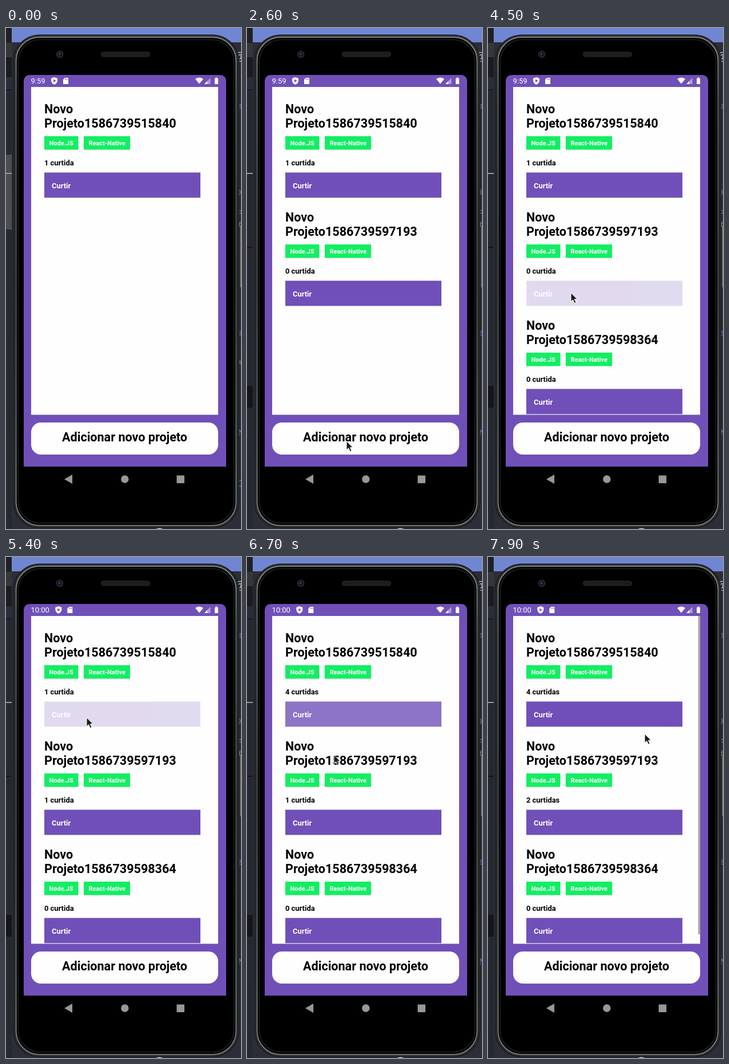
An HTML page for the animation above (8000 ms loop, 411 px wide and 875 px high).

```html
<!DOCTYPE html>
<html lang="pt-BR">
<head>
<meta charset="utf-8">
<title>Projetos</title>
<style>
  html, body { margin: 0; width: 100%; height: 100%; overflow: hidden; background: #272934; }
  svg { display: block; width: 100vw; height: 100vh; font-family: Roboto, sans-serif; }
  .title { font-size: 21.55px; font-weight: 700; }
  .tag { font-size: 11px; font-weight: 700; fill: #fff; }
  .small { font-size: 12.92px; font-weight: 700; }
  .code { font-size: 15px; fill: #5f7bd8; }
</style>
</head>
<body>
<svg viewBox="0 0 411 875" preserveAspectRatio="none">
  <defs>
    <linearGradient id="metal" x1="0" x2="0" y1="0" y2="1">
      <stop offset="0" stop-color="#858989"/>
      <stop offset=".12" stop-color="#5e6161"/>
      <stop offset=".5" stop-color="#4a4c4c"/>
      <stop offset="1" stop-color="#777a7a"/>
    </linearGradient>
    <clipPath id="list"><rect x="44" y="103" width="327" height="572.5"/></clipPath>
  </defs>

  <!-- desktop behind the phone -->
  <rect width="411" height="875" fill="#2b2d39"/>
  <rect x="10" width="401" height="25" fill="#7186d2"/>
  <rect width="10" height="875" fill="#252731"/>
  <rect width="10" height="26" fill="#202127"/>
  <rect y="26" width="10" height="25" fill="#363636"/>
  <rect y="51" width="10" height="35" fill="#1b1c21"/>
  <rect y="86" width="10" height="21" fill="#2a2c39"/>
  <rect y="107" width="10" height="1.5" fill="#17181d"/>
  <rect id="sidebar" y="221" width="10" height="131" fill="#4b4c50"/>
  <rect y="253" width="10" height="2" fill="#9a9a9a"/>
  <g id="sideLines" fill="#15161b">
    <rect y="382" width="10" height="2"/>
    <rect y="625" width="10" height="38"/>
  </g>
  <text x="400" y="55" font-size="19" fill="#ccc">@</text>
  <g class="code">
    <text x="405" y="141">a</text>
    <text id="codeMid" x="405" y="537">a</text>
    <text x="406" y="712">N</text>
    <text id="codeLow" x="405" y="801">G</text>
  </g>
  <g font-size="11" fill="#999">
    <text x="407" y="290">)</text>
    <text x="406" y="324">c</text>
    <text x="407" y="347">f</text>
    <text id="codeEnd" x="407" y="587">s</text>
  </g>
  <rect x="409.5" y="345" width="1.5" height="108" fill="#777"/>

  <!-- phone body -->
  <rect x="12" y="11.5" width="396" height="862" rx="47" fill="#17191a"/>
  <rect x="14" y="13.5" width="392" height="858" rx="45" fill="none" stroke="#3f4242"/>
  <rect x="17.5" y="16" width="385" height="853" rx="41" fill="#050505" stroke="url(#metal)" stroke-width="2.2"/>
  <rect x="21.5" y="20.5" width="377" height="844" rx="38" fill="#000" stroke="#1e2020" stroke-width="1.5"/>
  <path d="M262 875Q268 872 275 875Z" fill="#ddd"/>
  <circle cx="94" cy="46" r="6.5" fill="#252628"/>
  <circle cx="94" cy="46" r="4" fill="#15161d"/>
  <circle cx="93.5" cy="45.5" r="1.6" fill="#384691"/>
  <rect x="166.5" y="42" width="85" height="8" rx="4" fill="#1d1d1e" stroke="#2b2b2c"/>
  <g fill="#989898">
    <path d="M102 788L116 780V796Z"/>
    <circle cx="207.8" cy="788" r="6.7"/>
    <rect x="298.5" y="781.5" width="13.5" height="13.5" rx=".7"/>
  </g>

  <!-- app -->
  <path d="M31 766V94Q31 82 43 82H373Q385 82 385 94V766Z" fill="#7050b8"/>
  <g fill="#fff">
    <text id="clock" x="43.5" y="97" font-size="13"></text>
    <g id="icons">
      <path d="M84.5 86L90 88V92Q89.500 97 84.500 99Q79.500 97 79 92V88Z"/>
      <path d="M83 89.500L87.500 92.200L83 95Z" fill="#7050b8"/>
      <path d="M103 87H109V98H100V90Z"/>
      <path d="M103.500 88.500V91M105.500 88.500V91M107.500 88.500V91" stroke="#7050b8" stroke-width=".8"/>
    </g>
    <path d="M331 89Q338 84 345 89L338 97.500Z"/>
    <path d="M347 98L357.500 87V98Z" opacity=".45"/>
    <path d="M347 98L352 92.700V98Z"/>
    <path d="M365 88H366.500V86.500H369.500V88H371V98H365Z"/>
  </g>
  <rect x="44" y="103" width="327" height="572.5" fill="#fefefe"/>
  <g id="cards" clip-path="url(#list)"></g>
  <rect id="scrollbar" x="367.5" y="103" width="3.7" height="556" fill="#aaa"/>
  <rect x="44" y="689" width="327" height="56" rx="17" fill="#fefefe"/>
  <text id="add" class="title" x="207.5" y="721.5" text-anchor="middle">Adicionar novo projeto</text>

  <path id="cursor" d="M0 0V15.500L3.600 12.200L6.300 18.200L9 17L6.400 11.200H11.200Z" fill="#1c1c1c" stroke="#fff" stroke-width="1"/>
</svg>

<script>
const LOOP = 8000, STEP = 100, CARD_HEIGHT = 189;
const $ = id => document.getElementById(id);

const cards = [
  { stamp: '1586739515840', shown: 0, likes: 1, likedAt: [5600, 6100, 6400],
    presses: [[5400, 5500], [5800, 5920], [6300, 6540]] },
  { stamp: '1586739597193', shown: 2300, likes: 0, likedAt: [4700, 7400],
    presses: [[4500, 4600], [7200, 7290]] },
  { stamp: '1586739598364', shown: 3500, likes: 0, likedAt: [], presses: [] }
];
const addPresses = [[2100, 2330], [3300, 3340]];

// [time, x, y] of the pointer tip
const path = [
  [1200, 0, 690], [1300, 25, 735], [1400, 70, 751], [1600, 150, 737],
  [1800, 173, 723], [1900, 174, 721.5], [3600, 174, 721.5],
  [3800, 171, 680], [4100, 153, 530], [4300, 146, 470], [4400, 145, 462.5],
  [4700, 145, 462.5], [4900, 143, 390], [5100, 141, 295], [5200, 141, 280.5],
  [6500, 141, 280.5], [6600, 144, 303], [6700, 152, 345.5],
  [6900, 152, 430], [7000, 150, 455], [7300, 150, 455],
  [7500, 276, 430], [7600, 276, 430], [7700, 280, 400], [7900, 274, 309]
];

$('cards').innerHTML = cards.map((card, i) => `
  <g transform="translate(0 ${i * CARD_HEIGHT})">
    <text class="title" x="67" y="149">Novo</text>
    <text class="title" x="67" y="174.3">Projeto${card.stamp}</text>
    <path d="M67 189H126.500V212.500H67ZM136 189H217V212.500H136Z" fill="#12ee62"/>
    <text class="tag" x="75.500" y="205">Node.JS</text>
    <text class="tag" x="144.500" y="205">React-Native</text>
    <text class="small count" x="67" y="239.500"></text>
    <g class="like">
      <rect x="67" y="252.400" width="273" height="44" fill="#7050b8"/>
      <text class="small" x="80" y="279.500" fill="#fff">Curtir</text>
    </g>
  </g>`).join('');

cards.forEach((card, i) => {
  card.node = $('cards').children[i];
  card.count = card.node.querySelector('.count');
  card.button = card.node.querySelector('.like');
});

const show = (node, on) => node.setAttribute('visibility', on ? 'visible' : 'hidden');
const clamp = v => Math.min(1, Math.max(0, v));
const ease = v => v < .5 ? 2 * v * v : 1 - 2 * (1 - v) ** 2;

function touchOpacity(presses, t) {
  const last = presses.filter(([down]) => t >= down).pop();
  return last ? .2 + .8 * ease(clamp((t - last[1]) / 250)) : 1;
}

function pointerAt(t) {
  const next = path.findIndex(p => p[0] > t);
  if (next < 0) return path[path.length - 1].slice(1);
  const [t0, x0, y0] = path[next - 1], [t1, x1, y1] = path[next];
  const k = (t - t0) / (t1 - t0);
  return [x0 + (x1 - x0) * k, y0 + (y1 - y0) * k];
}

function render(t) {
  for (const card of cards) {
    const likes = card.likes + card.likedAt.filter(at => t >= at).length;
    show(card.node, t >= card.shown);
    card.count.textContent = `${likes} curtida${likes > 1 ? 's' : ''}`;
    card.button.setAttribute('opacity', touchOpacity(card.presses, t));
  }
  $('add').setAttribute('opacity', touchOpacity(addPresses, t));

  const late = t >= 4900;
  $('clock').textContent = late ? '10:00' : '9:59';
  $('icons').setAttribute('transform', `translate(${late ? 7.3 : 0} 0)`);
  show($('scrollbar'), t >= 7800);

  $('sidebar').setAttribute('opacity', 1 - clamp((t - 1100) / 800));
  const changed = t >= 2300;
  show($('sideLines'), changed);
  show($('codeEnd'), !changed);
  show($('codeLow'), !changed);
  $('codeMid').textContent = changed ? 'e' : 'a';

  show($('cursor'), t >= path[0][0]);
  if (t >= path[0][0]) $('cursor').setAttribute('transform', `translate(${pointerAt(t)})`);
}

const start = performance.now();
function tick() {
  const t = (performance.now() - start) % LOOP;
  render(Math.floor(t / STEP) * STEP);
  requestAnimationFrame(tick);
}
tick();
</script>
</body>
</html>
```
